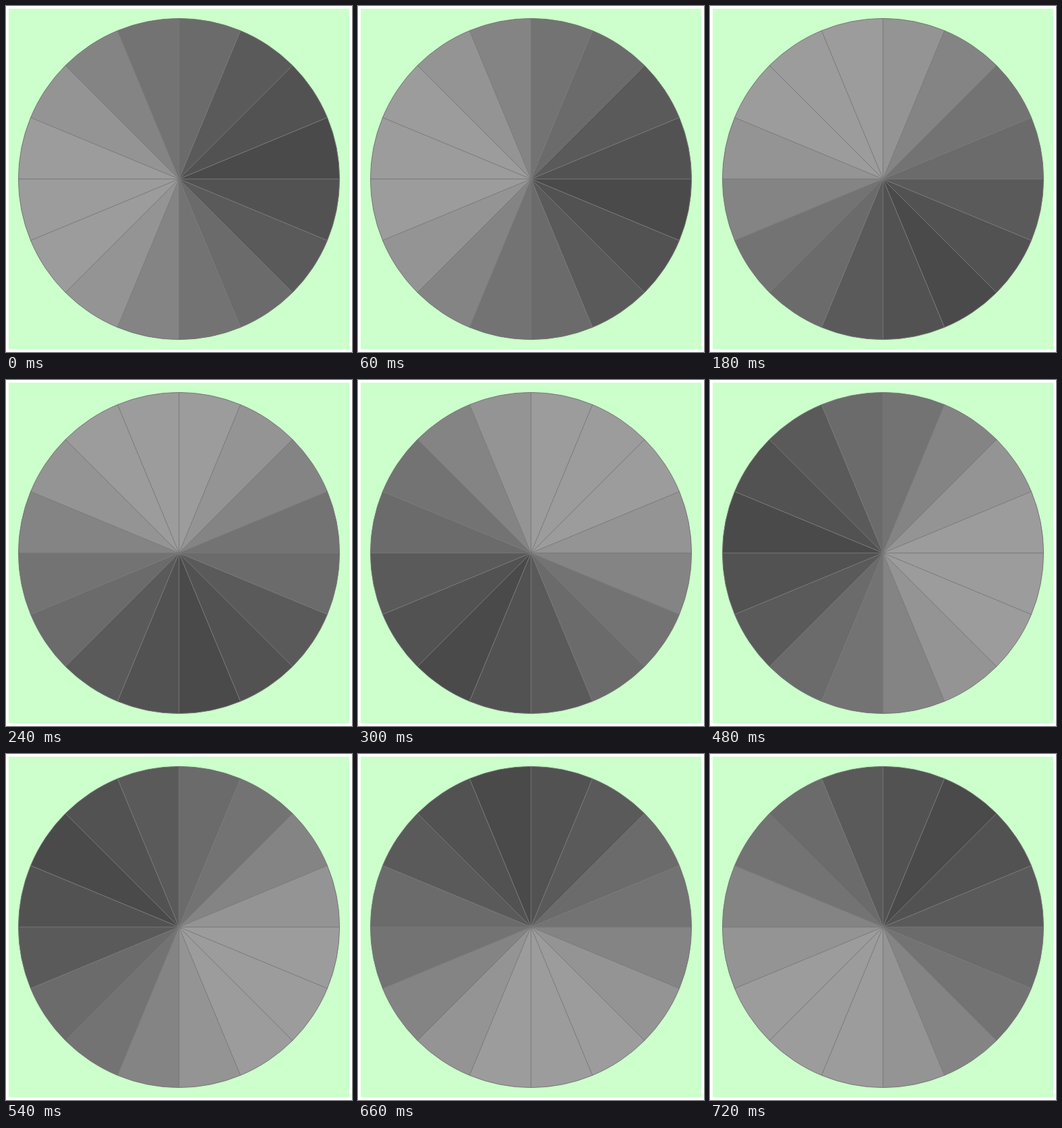
Write an HTML page with a canvas that moves like this. It is 512 by 512 pixels and loops after 780 ms.

```html
<!DOCTYPE html>
<html lang="en">
<head>
<meta charset="utf-8">
<title>Shaded wheel</title>
<style>
  html, body { margin: 0; width: 100%; height: 100%; overflow: hidden; background: #fff; }
  canvas { display: block; width: 512px; height: 512px; }
</style>
</head>
<body>
<canvas id="stage" width="512" height="512"></canvas>
<script>
const ctx = document.getElementById('stage').getContext('2d');
const SECTORS = 16;
const STEP_MS = 60;
const CENTER = 256;
const RADIUS = 237.6;
const SLICE = 2 * Math.PI / SECTORS;

// Gray levels by distance from the darkest sector.
const GRAYS = [74, 82, 90, 107, 115, 132, 148, 156, 156];
// Darkest sector at each step; the turn skips ahead in three places.
const DARKEST = [15, 0, 1, 2, 3, 5, 6, 7, 8, 9, 10, 11, 13];

function sectorPath(index) {
  ctx.beginPath();
  ctx.moveTo(CENTER, CENTER);
  ctx.arc(CENTER, CENTER, RADIUS, index * SLICE, (index + 1) * SLICE);
  ctx.closePath();
}

function sectorColor(index, darkest) {
  const ahead = (index - darkest + SECTORS) % SECTORS;
  const gray = GRAYS[Math.min(ahead, SECTORS - ahead)];
  return `rgb(${gray}, ${gray}, ${gray})`;
}

function drawOutlines() {
  ctx.strokeStyle = '#777';
  ctx.lineWidth = 1;
  ctx.beginPath();
  ctx.arc(CENTER, CENTER, RADIUS, 0, 2 * Math.PI);
  for (let i = 0; i < SECTORS; i++) {
    ctx.moveTo(CENTER, CENTER);
    ctx.lineTo(CENTER + RADIUS * Math.cos(i * SLICE), CENTER + RADIUS * Math.sin(i * SLICE));
  }
  ctx.stroke();
}

function draw(time) {
  const darkest = DARKEST[Math.floor(time / STEP_MS) % DARKEST.length];
  ctx.fillStyle = '#fff';
  ctx.fillRect(0, 0, 512, 512);
  ctx.fillStyle = '#cfc';
  ctx.fillRect(4, 4, 504, 504);
  for (let i = 0; i < SECTORS; i++) {
    sectorPath(i);
    ctx.fillStyle = sectorColor(i, darkest);
    ctx.fill();
  }
  drawOutlines();
}

let start;
function tick(now) {
  start ??= now;
  draw(now - start);
  requestAnimationFrame(tick);
}

draw(0);
requestAnimationFrame(tick);
</script>
</body>
</html>
```
